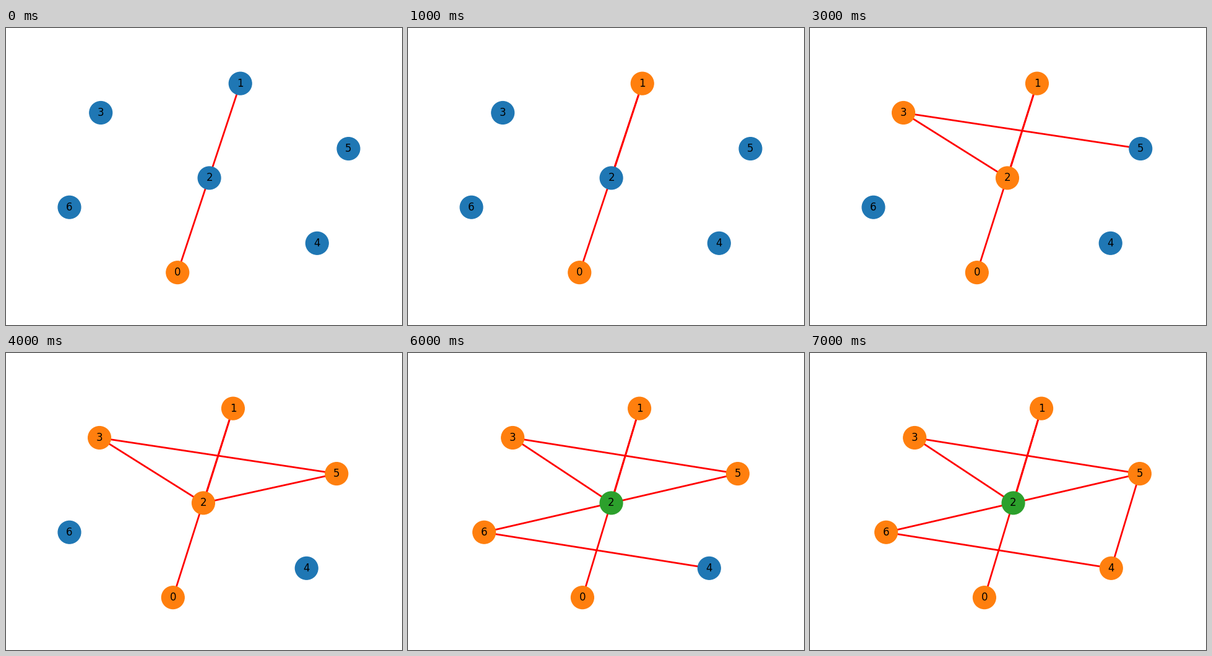
Animation, 640 px wide and 480 px high, one loop 8 s. Source, as a matplotlib script:

```python
import numpy as np
import matplotlib.pyplot as plt
from matplotlib.animation import FuncAnimation

WALK = [0, 1, 2, 3, 5, 2, 6, 4, 5]
COLORS = ["#1f77b4", "#ff7f0e", "#2ca02c"]  # by number of visits
STEPS = len(WALK) - 1
CENTER_Y = 242.4
RADIUS_X, RADIUS_Y = 236.6, 156.4
TILT = 17.62

# Six nodes sit on a tilted hexagon, node 2 near its centre.
offsets = np.zeros((7, 2))
for i, node in enumerate([5, 1, 3, 6, 0, 4]):
    angle = np.radians(TILT + 60 * i)
    offsets[node] = RADIUS_X * np.cos(angle), -RADIUS_Y * np.sin(angle)
offsets[2] = 0.6, 0


def layout(step):
    """Node positions in pixels; the view rescales as edges are added."""
    if step < 3:
        center, scale = 328.0, 1.0
    elif step < 5:
        center, scale = 318.4, 0.9574
    else:
        center, scale = 328.0, 0.9087
    return offsets * [scale, 1] + [center, CENTER_Y]


fig = plt.figure(figsize=(6.4, 4.8), dpi=100, facecolor="white")
ax = fig.add_axes([0, 0, 1, 1])


def draw(step):
    ax.clear()
    ax.set_xlim(0, 640)
    ax.set_ylim(480, 0)
    ax.axis("off")
    pos = layout(step)
    for a, b in zip(WALK[:step + 1], WALK[1:step + 2]):
        ax.plot(*pos[[a, b]].T, color="red", lw=2, zorder=1)
    visited = WALK[:step + 1]
    fills = [COLORS[visited.count(n)] for n in range(7)]
    ax.scatter(*pos.T, s=700, c=fills, zorder=2)
    for node, (x, y) in enumerate(pos):
        ax.text(x, y, str(node), size=12, family="DejaVu Sans",
                ha="center", va="center", zorder=3)
    return []


anim = FuncAnimation(fig, draw, frames=STEPS, interval=1000,
                     init_func=lambda: draw(0), repeat=True, repeat_delay=0)
plt.show()
```
